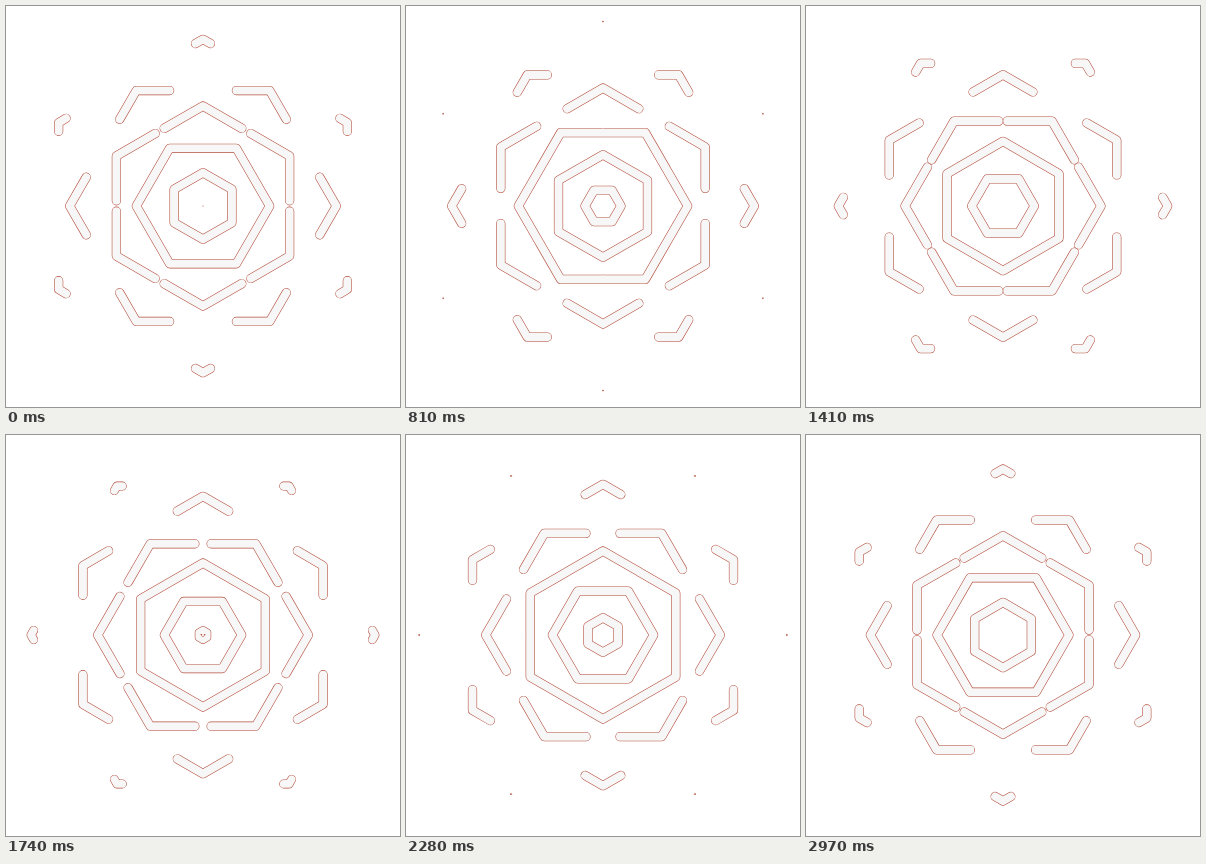
Recreate the animation shown at these times as an HTML page. Size 394 px wide and 401 px high, loop 3000 ms.

```html
<!DOCTYPE html>
<html lang="en">
<head>
<meta charset="utf-8">
<title>Expanding hexagons</title>
<style>
  html, body { margin: 0; width: 100%; height: 100%; overflow: hidden; background: #fff; }
  svg { display: block; }
  path { fill: none; stroke-linecap: round; stroke-linejoin: round; }
  .edge { stroke: #b5503f; }
  .body { stroke: #f7f7f7; }
</style>
</head>
<body>
<svg id="stage" width="394" height="401" viewBox="0 0 394 401"></svg>
<script>
const LOOP = 3000;
const CENTER = { x: 197, y: 200 };
const SPACING = 100 / 3;
const MAX_RADIUS = 186;
const BODY_WIDTH = 8.1;
const EDGE_WIDTH = 1.15;
const stage = document.getElementById('stage');

function smooth(from, to, value) {
  const x = Math.min(1, Math.max(0, (value - from) / (to - from)));
  return x * x * (3 - 2 * x);
}

function addPath(className) {
  const path = document.createElementNS('http://www.w3.org/2000/svg', 'path');
  path.setAttribute('class', className);
  return stage.appendChild(path);
}

// Even rings have a flat top, odd rings a pointed one.
const rings = [-1, 0, 1, 2, 3, 4, 5].map(index => ({
  index,
  turn: index % 2 ? Math.PI / 6 : 0,
  edge: addPath('edge'),
  body: addPath('body')
}));

const format = p => p.x.toFixed(2) + ' ' + p.y.toFixed(2);
const mix = (a, b, t) => ({ x: a.x + (b.x - a.x) * t, y: a.y + (b.y - a.y) * t });

// Each side opens at its middle until only the corners remain.
function hexagon(radius, turn) {
  const corners = Array.from({ length: 6 }, (_, i) => ({
    x: CENTER.x + radius * Math.cos(turn + i * Math.PI / 3),
    y: CENTER.y + radius * Math.sin(turn + i * Math.PI / 3)
  }));
  const gap = smooth(77.8, 188.8, radius);
  if (gap === 0) return 'M' + corners.map(format).join('L') + 'Z';
  const arm = (1 - gap) / 2;
  return corners.map((corner, i) => {
    const before = mix(corner, corners[(i + 5) % 6], arm);
    const after = mix(corner, corners[(i + 1) % 6], arm);
    return 'M' + [before, corner, after].map(format).join('L');
  }).join('');
}

function draw(time) {
  const growth = (time % LOOP) / LOOP * 2;
  for (const { index, turn, edge, body } of rings) {
    const radius = (index + growth) * SPACING;
    const visible = radius >= 0 && radius < MAX_RADIUS;
    edge.style.display = body.style.display = visible ? '' : 'none';
    if (!visible) continue;
    const shape = hexagon(radius, turn);
    const width = BODY_WIDTH * smooth(0, 8, radius) * (1 - smooth(170, MAX_RADIUS, radius));
    edge.setAttribute('d', shape);
    body.setAttribute('d', shape);
    edge.setAttribute('stroke-width', width + EDGE_WIDTH);
    body.setAttribute('stroke-width', width);
  }
}

const start = performance.now();
function tick() {
  draw(performance.now() - start);
  requestAnimationFrame(tick);
}
draw(0);
requestAnimationFrame(tick);
</script>
</body>
</html>
```
